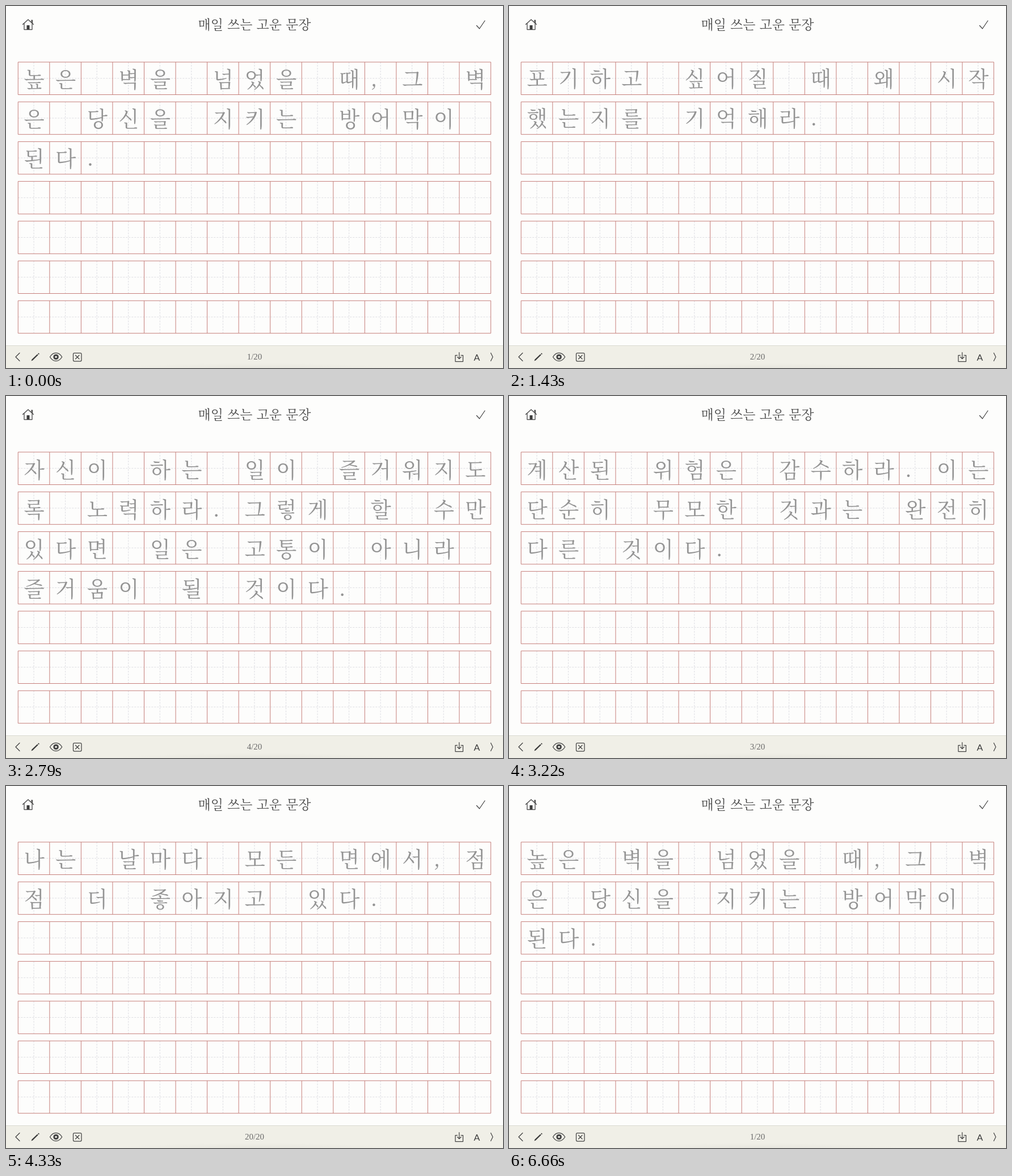
Recreate the animation shown at these times as an HTML page. Size 876 by 639 pixels, loop 6.7 s.

```html
<!DOCTYPE html>
<html lang="ko">
<head>
<meta charset="utf-8">
<title>글씨 연습</title>
<style>
  html, body { margin: 0; width: 100%; height: 100%; overflow: hidden; background: #fdfdfc; }
  svg { display: block; width: 876px; height: 639px; }
  text { text-anchor: middle; }
  .hangul { font-family: "Noto Serif CJK KR", "Noto Serif KR", "Noto Sans CJK KR", "Noto Sans CJK", serif; font-weight: 300; }
  .title { font-size: 23px; fill: #4c4c4c; }
  .cell { font-size: 37.5px; fill: #949494; }
  .count { font: 15px "Liberation Serif", serif; fill: #6a6a6a; }
  .letter { font: 16px Lato, "Liberation Sans", sans-serif; fill: #3c3c3c; }
  .grid { fill: none; stroke: #c67f7b; }
  .guide { fill: none; stroke: #dddde2; stroke-dasharray: 3 2; }
  .icon { fill: none; stroke: #444; stroke-width: 1.25; stroke-linecap: round; stroke-linejoin: round; }
  .icon .solid { fill: #3c3c3c; stroke: none; }
</style>
</head>
<body>
<svg viewBox="0 0 876 639">
  <defs>
    <radialGradient id="shade" cx=".5" cy="1" r=".5" gradientTransform="translate(0 -.2) scale(1 1.2)">
      <stop offset="0" stop-color="#000" stop-opacity=".035"/>
      <stop offset="1" stop-color="#000" stop-opacity="0"/>
    </radialGradient>
  </defs>
  <rect width="876" height="639" fill="#fdfdfc"/>
  <rect y="599" width="876" height="40" fill="#f0efe7"/>
  <rect y="599" width="876" height="1" fill="#dadad2"/>
  <rect x="180" y="624" width="520" height="15" fill="url(#shade)"/>

  <path id="guides" class="guide"/>
  <path id="grid" class="grid"/>
  <text class="hangul title" x="438" y="41">매일 쓰는 고운 문장</text>
  <g id="pages"></g>

  <g class="icon">
    <path d="M29.500 32.500 39 24l9.500 8.500M32 31v10.500h14V31M45 28.500V25h1.500v5"/>
    <path class="solid" d="M36.500 34h5v8h-5z"/>
    <path d="M829.500 34.500 834.500 40 844 26"/>
    <path d="M24 612.500 17 619.500 24 626.500"/>
    <path class="solid" d="M44.500 626.500 45.500 623.800 55.300 614.500 56.800 616 47.200 625.500ZM56.100 613.700 57.400 612.500 58.900 614 57.700 615.300Z"/>
    <path d="M77.500 619.500C83 610 93 610 98.700 619.500 93 629 83 629 77.500 619.500Z"/>
    <circle cx="88.100" cy="619.500" r="3.300" stroke-width="3"/>
    <rect x="118.500" y="612.500" width="14.500" height="14.500" rx="2"/>
    <path d="M122.500 616.500l6.500 6.500m0-6.500-6.500 6.500"/>
    <path d="M795.500 616.500h-3.500v11h13.500v-11H802M798.800 611.500v11M795.500 619.500l3.300 3.300 3.300-3.300"/>
    <path d="M854.500 612.500 858 619.500 854.500 626.500"/>
  </g>
  <text class="letter" x="830" y="625.500">A</text>
</svg>
<script>
  const LOOP = 6700, COLS = 15, ROWS = 7;
  const LEFT = 21.3, TOP = 99, STEP_X = 55.55, STEP_Y = 70.2, ROW_H = 57.5;

  // Page number -> vertical nudge and the manuscript rows, one character per cell
  const PAGES = {
    1: [0, ["높은 벽을 넘었을 때,그 벽", "은 당신을 지키는 방어막이", "된다."]],
    2: [-1, ["포기하고 싶어질 때 왜 시작", "했는지를 기억해라."]],
    3: [1, ["계산된 위험은 감수하라.이는", "단순히 무모한 것과는 완전히", "다른 것이다."]],
    4: [1, ["자신이 하는 일이 즐거워지도", "록 노력하라.그렇게 할 수만", "있다면 일은 고통이 아니라", "즐거움이 될 것이다."]],
    20: [0, ["나는 날마다 모든 면에서,점", "점 더 좋아지고 있다."]]
  };

  // [start in ms, page shown]
  const TURNS = [[0, 1], [1000, 2], [1640, 3], [2050, 4], [2850, 3],
                 [3450, 2], [3800, 1], [4180, 20], [5250, 1]];

  const byId = id => document.getElementById(id);
  const colX = i => LEFT + i * STEP_X;
  const rowY = i => TOP + i * STEP_Y;

  function make(parent, tag, attrs, text = "") {
    const el = document.createElementNS("http://www.w3.org/2000/svg", tag);
    for (const key in attrs) el.setAttribute(key, attrs[key]);
    el.textContent = text;
    return parent.appendChild(el);
  }

  function drawGrid() {
    let lines = "", guides = "";
    const right = colX(COLS);
    for (let r = 0; r < ROWS; r++) {
      const top = rowY(r), bottom = top + ROW_H, middle = top + ROW_H / 2;
      lines += `M${LEFT} ${top}H${right}V${bottom}H${LEFT}Z`;
      guides += `M${LEFT} ${middle}H${right}`;
      for (let c = 0; c < COLS; c++) {
        if (c) lines += `M${colX(c)} ${top}V${bottom}`;
        guides += `M${colX(c + 0.5)} ${top}V${bottom}`;
      }
    }
    byId("grid").setAttribute("d", lines);
    byId("guides").setAttribute("d", guides);
  }

  function drawPage(number, [nudge, rows]) {
    const page = make(byId("pages"), "g", { visibility: "hidden" });
    rows.forEach((row, r) => [...row].forEach((char, c) => {
      if (char === " ") return;
      const shift = ".,".includes(char) ? 16 : STEP_X / 2 + 0.6;
      make(page, "text", {
        class: "hangul cell", x: colX(c) + shift, y: rowY(r) + 43.8 + nudge
      }, char);
    }));
    make(page, "text", { class: "count", x: 438, y: 624 }, `${number}/20`);
    return page;
  }

  drawGrid();
  const views = {};
  for (const number in PAGES) views[number] = drawPage(number, PAGES[number]);

  const start = performance.now();
  let shown;

  function show(time) {
    let page = 1;
    for (const [from, number] of TURNS) if (time >= from) page = number;
    if (page === shown) return;
    if (shown) views[shown].setAttribute("visibility", "hidden");
    views[page].setAttribute("visibility", "visible");
    shown = page;
  }

  function tick() {
    show((performance.now() - start) % LOOP);
    requestAnimationFrame(tick);
  }
  tick();
</script>
</body>
</html>
```
